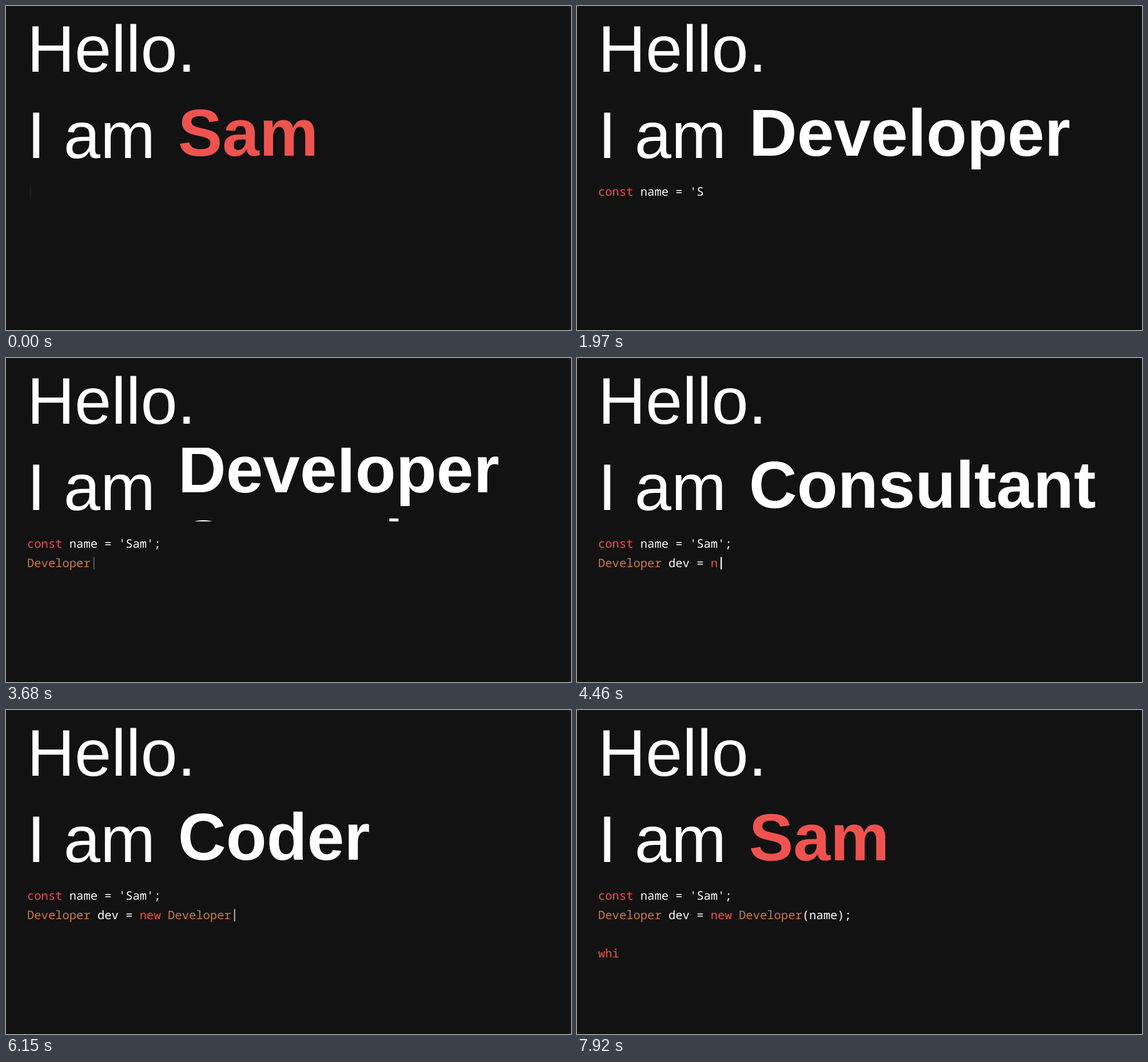
Recreate the animation shown at these times as an HTML page. Size 988 by 567 pixels, loop 7990 ms.

```html
<!DOCTYPE html>
<html lang="en">
<head>
<meta charset="utf-8">
<title>Hello</title>
<style>
  html, body { margin: 0; width: 100%; height: 100%; overflow: hidden; background: #121212; }
  svg { display: block; }
  text { fill: #fff; white-space: pre; text-rendering: geometricPrecision; }
  .big { font: 115.4px "Liberation Sans", Arial, sans-serif; }
  .word { font-size: 116.2px; font-weight: bold; }
  .code { font: 500 20.5px "Noto Sans Mono", monospace; }
</style>
</head>
<body>
<svg width="988" height="567">
  <rect y="566" width="988" height="1" fill="#050505"/>
  <text class="big" x="36.7" y="114.5">Hello.</text>
  <text class="big" x="36.7" y="265.7">I am</text>
  <svg y="157" width="988" height="129" overflow="hidden"><g id="words"></g></svg>
  <g id="code"></g>
  <rect id="cursor" width="2.2" height="21.5" fill="#fff"/>
</svg>
<script>
const LOOP = 7990, RED = '#ef5350', ORANGE = '#d0794a', WHITE = '#fff';
const WORD_H = 130, LINE_H = 33.6, CHAR_W = 12.3, LEFT = 37;
const words = document.getElementById('words');
const code = document.getElementById('code');
const cursor = document.getElementById('cursor');

function add(parent, tag, attrs, text = '') {
  const el = document.createElementNS('http://www.w3.org/2000/svg', tag);
  for (const k in attrs) el.setAttribute(k, attrs[k]);
  el.textContent = text;
  return parent.appendChild(el);
}

// CSS-style cubic-bezier timing function
const bezier = (x1, y1, x2, y2) => x => {
  const at = (a, b, s) => 3 * a * s * (1 - s) ** 2 + 3 * b * s * s * (1 - s) + s ** 3;
  let lo = 0, hi = 1;
  for (let i = 0; i < 24; i++) {
    const mid = (lo + hi) / 2;
    if (at(x1, x2, mid) < x) lo = mid; else hi = mid;
  }
  return at(y1, y2, lo);
};
const ease = bezier(.25, .1, .25, 1);
const easeInOut = bezier(.42, 0, .58, 1);
const clamp = v => Math.min(1, Math.max(0, v));

['Sam', 'Developer', 'Consultant', 'Coder', 'Sam'].forEach((word, i) => {
  const el = add(words, 'text', { class: 'big word', x: 300.8, y: 104.5 + i * WORD_H }, word);
  if (word === 'Sam') el.style.fill = RED;
});

const source = [
  [['const', RED], [" name = 'Sam';", WHITE]],
  [['Developer', ORANGE], [' dev = ', WHITE], ['new', RED], [' ', WHITE], ['Developer', ORANGE], ['(name);', WHITE]],
  [],
  [['whi', RED]]
];
const full = source.map(line => line.map(token => token[0]).join('')).join('\n');
const tokens = [];
let offset = 0;
source.forEach((line, row) => {
  const el = add(code, 'text', { class: 'code', x: LEFT, y: 332.4 + row * LINE_H });
  for (const [text, color] of line) {
    tokens.push({ text, start: offset, el: add(el, 'tspan', { style: 'fill:' + color }) });
    offset += text.length;
  }
  offset++;
});

// [time, characters typed], linear in between
const typing = [
  [170, 0], [310, 1], [870, 5], [1450, 10], [1650, 11], [1950, 15], [2430, 20], [2580, 21],
  [3040, 23], [3660, 29], [3760, 30], [3830, 31], [3910, 32], [4430, 37], [4740, 39],
  [5520, 44], [6130, 49], [7080, 56], [7200, 58], [7560, 59], [7900, 61]
];
function typedAt(t) {
  const i = typing.findIndex(p => p[0] > t);
  if (i === 0) return 0;
  if (i < 0) return full.length;
  const [t0, n0] = typing[i - 1], [t1, n1] = typing[i];
  return Math.floor(n0 + (n1 - n0) * (t - t0) / (t1 - t0) + 1e-6);
}

function draw(t) {
  let slide = 0;
  for (let i = 0; i < 4; i++) slide += easeInOut(clamp((t - 1555 - 2000 * i) / 400));
  words.setAttribute('transform', `translate(0 ${-slide * WORD_H})`);

  const n = typedAt(t);
  for (const { text, start, el } of tokens) el.textContent = text.slice(0, Math.max(0, n - start));

  const lines = full.slice(0, n).split('\n');
  const row = lines.length - 1;
  cursor.setAttribute('x', LEFT + lines[row].length * CHAR_W + 5);
  cursor.setAttribute('y', 314.8 + row * LINE_H);
  const phase = (t + 30) % 1000 / 500;
  cursor.setAttribute('opacity', phase < 1 ? ease(phase) : 1 - ease(phase - 1));
}

function tick() {
  draw(performance.now() % LOOP);
  requestAnimationFrame(tick);
}
tick();
</script>
</body>
</html>
```
